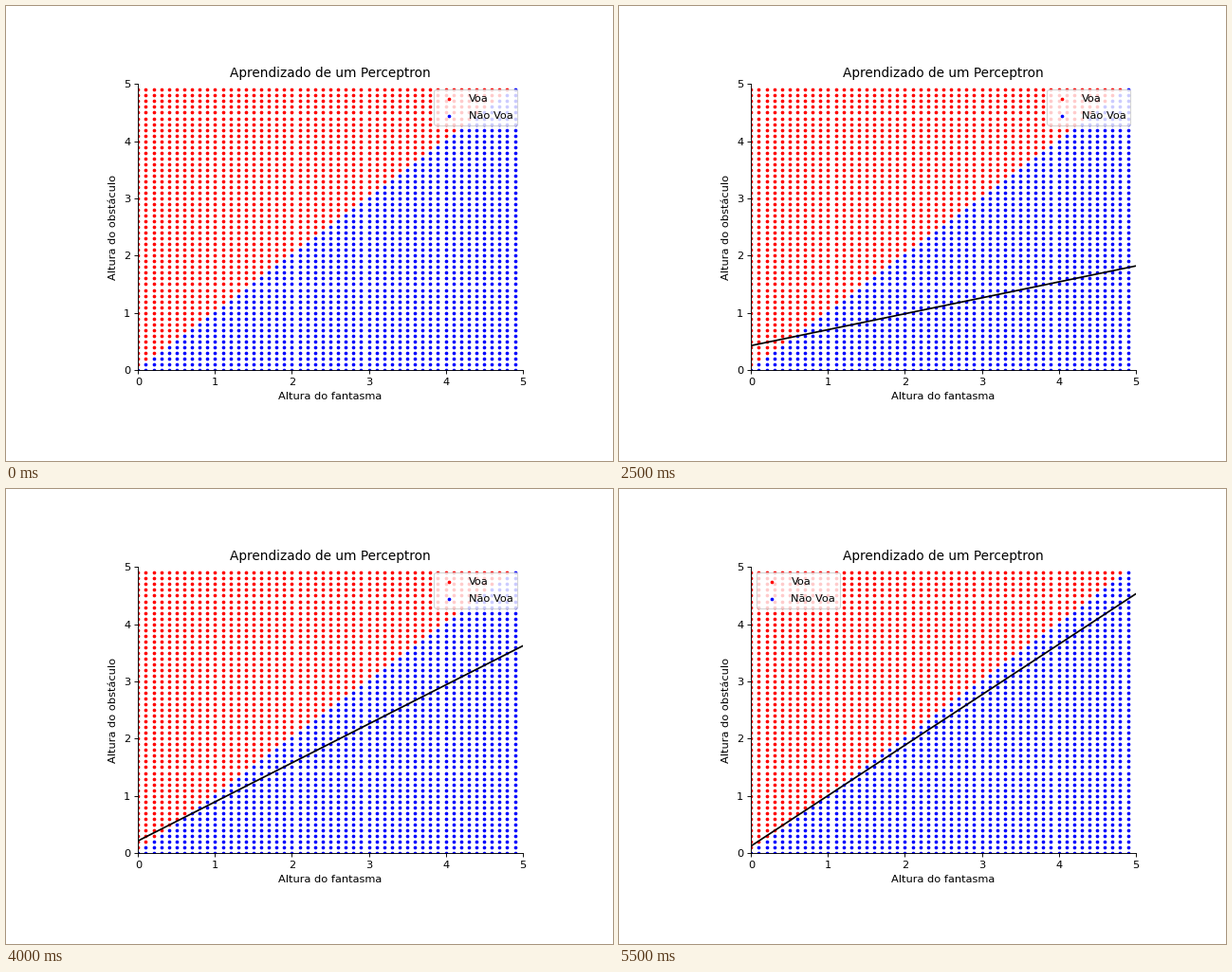
A matplotlib script for the animation above (6 s loop, 640 by 480 pixels).

```python
import math

import numpy as np
import matplotlib.pyplot as plt
from matplotlib.animation import FuncAnimation

FRAMES = 12
INTERVAL = 500
LEGEND_MOVES_AT = 10

plt.rcParams["font.family"] = "DejaVu Sans"
fig = plt.figure(figsize=(7.8125, 5.859375), dpi=81.92, facecolor="white")
ax = fig.add_subplot()
fig.subplots_adjust(left=0.2178, right=0.851, bottom=0.2, top=0.8285)

ghost, obstacle = np.meshgrid(np.arange(50) / 10, np.arange(50) / 10)
flies = obstacle > ghost
for mask, color, label in ((flies, "red", "Voa"), (~flies, "blue", "Não Voa")):
    ax.scatter(ghost[mask], obstacle[mask], s=5, c=color, label=label)

boundary, = ax.plot([], [], color="black", lw=1.5)

ax.set(xlim=(0, 5), ylim=(0, 5), xticks=range(6), yticks=range(6),
       title="Aprendizado de um Perceptron")
ax.set_xlabel("Altura do fantasma")
ax.set_ylabel("Altura do obstáculo", labelpad=5)
ax.spines[["top", "right"]].set_visible(False)
legend = ax.legend(loc="upper right", labelspacing=0.75)


def decision_line(step):
    """Slope and intercept after a training step; learning slows at the end."""
    progress = min(step - 1, 8) + max(step - 9, 0) / 2
    slope = (-0.616 + 0.25 * progress) / (1 + 0.095 * progress)
    intercept = 0.742 * math.exp(-0.074 * progress ** 1.45)
    return slope, intercept


def update(step):
    x = np.array([0, 5] if step else [])
    slope, intercept = decision_line(max(step, 1))
    boundary.set_data(x, slope * x + intercept)
    legend.set_loc("upper left" if step >= LEGEND_MOVES_AT else "upper right")
    return boundary, legend


animation = FuncAnimation(fig, update, frames=FRAMES, interval=INTERVAL,
                          repeat=True, repeat_delay=0)
plt.show()
```
